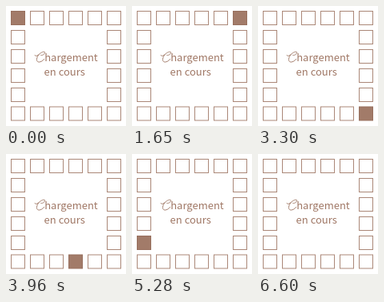
Animation of 150x150 px, one loop 6.93 s. Source, as an HTML page:

```html
<!DOCTYPE html>
<html lang="fr">
<head>
<meta charset="utf-8">
<title>Chargement en cours</title>
<style>
  html, body { margin: 0; width: 100%; height: 100%; overflow: hidden; background: #fff; }
  svg { display: block; width: 150px; height: 150px; }
  text { font: 13px "Noto Sans CJK JP", "Noto Sans CJK SC", "Noto Sans CJK", "Noto Sans", sans-serif; fill: #a07866; }
  .cell { fill: #fff; stroke: #ab8878; stroke-width: 1; }
  .cell.on { fill: #a27b69; stroke: #98705f; }
  .initial { fill: none; stroke: #a07866; stroke-width: 0.95; stroke-linecap: round; stroke-linejoin: round; }
</style>
</head>
<body>
<svg viewBox="0 0 150 150" role="img" aria-label="Chargement en cours">
  <g id="cells"></g>
  <path class="initial" d="M43.6 61.6 C44.4 62.4 48.6 60.4 48.6 58.2 C48.6 56.2 44.2 57.4 41.2 60.6 C38.2 63.8 37.2 69.4 40.6 70 C43.4 70.4 46 68.4 47.6 66.4 M41.2 60.6 C39 62.6 36.4 63.4 36.2 61.4"/>
  <text x="48.2" y="69">hargement</text>
  <text x="47.6" y="87">en cours</text>
</svg>
<script>
  const STEP = 330, SIDE = 5, PITCH = 24, START = 6, SIZE = 18;
  const COUNT = SIDE * 4;
  const group = document.getElementById("cells");

  // Clockwise position around the square, from the top left corner
  function place(i) {
    const k = i % SIDE;
    return [[k, 0], [SIDE, k], [SIDE - k, SIDE], [0, SIDE - k]][Math.floor(i / SIDE)];
  }

  const cells = Array.from({ length: COUNT }, (_, i) => {
    const [col, row] = place(i);
    const cell = document.createElementNS("http://www.w3.org/2000/svg", "rect");
    const attrs = {
      x: START + col * PITCH + 0.5,
      y: START + row * PITCH - (row === SIDE ? 0.5 : 0) + 0.5,
      width: SIZE - 1,
      height: SIZE - 1,
      class: "cell"
    };
    for (const name in attrs) cell.setAttribute(name, attrs[name]);
    return group.appendChild(cell);
  });

  // One extra step at the end leaves every cell empty
  function draw(now) {
    const active = Math.floor(now / STEP) % (COUNT + 1);
    cells.forEach((cell, i) => cell.classList.toggle("on", i === active));
    requestAnimationFrame(draw);
  }
  draw(performance.now());
</script>
</body>
</html>
```
